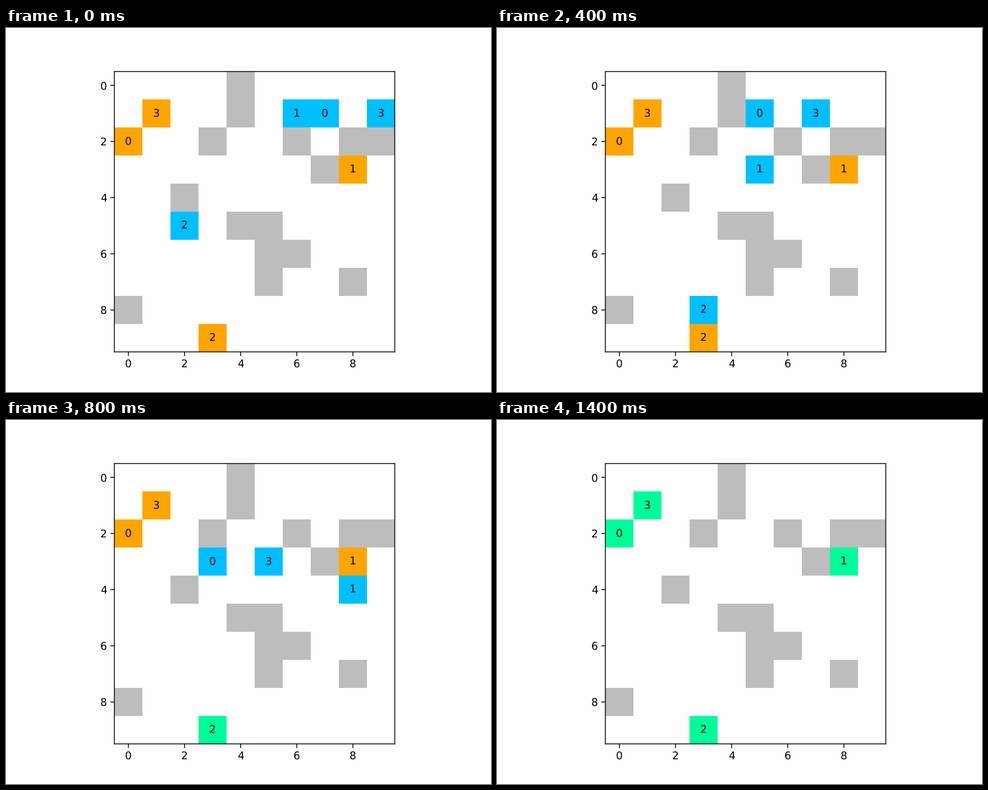
Write a matplotlib script that moves like this. It is 864 px wide and 648 px high and loops after 8 s.

```python
import numpy as np
import matplotlib.pyplot as plt
from matplotlib.animation import FuncAnimation
from matplotlib.colors import to_rgb

WIDTH, HEIGHT, DPI = 864, 648, 135
LEFT, RIGHT, TOP, BOTTOM = 193.05, 692.55, 77.5, 576.55  # plot box in pixels
SIZE = 10
INTERVAL = 100
FRAMES = 80

WHITE, WALL = to_rgb("#fefefe"), to_rgb("#bdbdbd")
GOAL, AGENT, DONE = to_rgb("orange"), to_rgb("deepskyblue"), to_rgb("#00fc9a")

# Cells are (column, row)
WALLS = [(4, 0), (4, 1), (3, 2), (6, 2), (8, 2), (9, 2), (7, 3), (2, 4),
         (4, 5), (5, 5), (5, 6), (6, 6), (5, 7), (8, 7), (0, 8)]
STARTS = [(7, 1), (6, 1), (2, 5), (9, 1)]
MOVES = ["..LLDDLLLLLU", ".LDDRDRRU", "RDDDD", "L..LLLDDLLLLUU"]
STEP = {"L": (-1, 0), "R": (1, 0), "U": (0, -1), "D": (0, 1), ".": (0, 0)}


def position(agent, time):
    """Cell of an agent after the given number of moves."""
    x, y = STARTS[agent]
    for move in MOVES[agent][:time]:
        dx, dy = STEP[move]
        x, y = x + dx, y + dy
    return x, y


GOALS = [position(i, len(moves)) for i, moves in enumerate(MOVES)]


def paint(time):
    grid = np.full((SIZE, SIZE, 3), WHITE)
    for x, y in WALLS:
        grid[y, x] = WALL
    for x, y in GOALS:
        grid[y, x] = GOAL
    for i, goal in enumerate(GOALS):
        x, y = position(i, time)
        grid[y, x] = DONE if (x, y) == goal else AGENT
    return grid


plt.rcParams.update({"font.family": "DejaVu Sans", "text.hinting": "none"})
fig = plt.figure(figsize=(WIDTH / DPI, HEIGHT / DPI), dpi=DPI, facecolor=WHITE)
ax = fig.add_axes([LEFT / WIDTH, 1 - BOTTOM / HEIGHT,
                   (RIGHT - LEFT) / WIDTH, (BOTTOM - TOP) / HEIGHT])
image = ax.imshow(paint(0), interpolation="nearest", aspect="auto")
ax.set_xticks(range(0, SIZE, 2))
ax.set_yticks(range(0, SIZE, 2))
for spine in ax.spines.values():
    spine.set_snap(False)


def label(i, cell):
    return ax.text(*cell, str(i), ha="center", va="center", fontsize=10)


goal_labels = [label(i, cell) for i, cell in enumerate(GOALS)]
agent_labels = [label(i, cell) for i, cell in enumerate(STARTS)]


def update(time):
    image.set_data(paint(time))
    for i, text in enumerate(agent_labels):
        cell = position(i, time)
        text.set_position(cell)
        goal_labels[i].set_visible(cell != GOALS[i])
    return [image, *goal_labels, *agent_labels]


anim = FuncAnimation(fig, update, frames=FRAMES, interval=INTERVAL,
                     init_func=lambda: update(0), repeat=True, repeat_delay=0)
plt.show()
```
